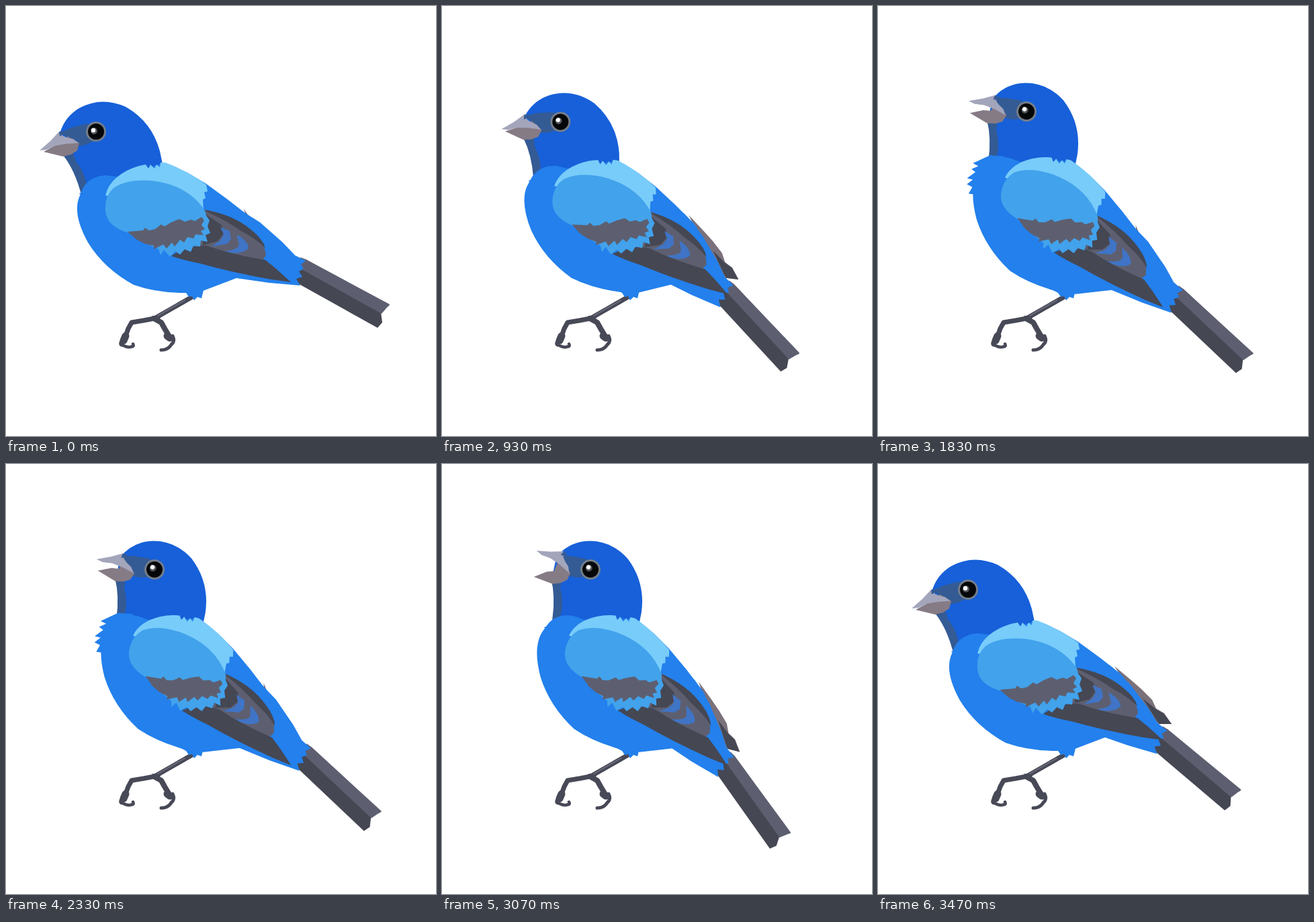
These frames come from a looping animation (640 px wide and 640 px high, 3510 ms). An HTML page:

```html
<!DOCTYPE html>
<html lang="en">
<head>
<meta charset="utf-8">
<title>Blue songbird</title>
<style>
  /* lift: body raised, nod: head nod, drop: tail lowered, gape: beak open, puff: throat feathers */
  @property --lift { syntax: "<number>"; inherits: true; initial-value: 0; }
  @property --nod  { syntax: "<number>"; inherits: true; initial-value: 0; }
  @property --drop { syntax: "<number>"; inherits: true; initial-value: 0; }
  @property --gape { syntax: "<number>"; inherits: true; initial-value: 0; }
  @property --puff { syntax: "<number>"; inherits: true; initial-value: 0; }

  html, body { margin: 0; width: 100%; height: 100%; overflow: hidden; background: #fff; }
  svg {
    display: block; width: 100%; height: 100%;
    animation: 3510ms ease-in-out infinite;
    animation-name: lift, nod, drop, gape, puff;
  }
  @keyframes lift { 0%, 21.9% { --lift: 0; } 31.3%, 91.2% { --lift: 1; } 98.8%, 100% { --lift: 0; } }
  @keyframes nod { 0%, 8% { --nod: 0; } 12.5%, 14.6% { --nod: 1; } 17.7%, 100% { --nod: 0; } }
  @keyframes drop {
    0%, 7.5% { --drop: 0; } 9.5%, 43% { --drop: 1; }
    45%, 70% { --drop: 0; } 72%, 100% { --drop: 1; }
  }
  @keyframes gape {
    0%, 32% { --gape: 0; } 36%, 41% { --gape: .36; } 46.5% { --gape: 1; } 53.1% { --gape: .36; }
    59.8% { --gape: 1; } 65%, 67.5% { --gape: .36; } 73% { --gape: 1; } 79.6% { --gape: .36; }
    85.5%, 89% { --gape: 1; } 93%, 100% { --gape: 0; }
  }
  @keyframes puff {
    0%, 32% { --puff: 0; } 36%, 41% { --puff: 1; } 46.5% { --puff: 0; } 53.1% { --puff: 1; }
    59.8% { --puff: 0; } 65%, 67.5% { --puff: 1; } 73% { --puff: 0; } 79.6% { --puff: 1; }
    85.5%, 100% { --puff: 0; }
  }

  .body { transform-origin: 275px 432px; transform: rotate(calc(var(--lift) * 14.3deg)); }
  .head {
    transform-origin: 134px 187px;
    transform:
      translate(calc(var(--lift) * 87px + var(--nod) * 12px), calc(var(--lift) * -30px + var(--nod) * -6px))
      rotate(calc(var(--lift) * 23.3deg + var(--nod) * 10deg));
  }
  .tail {
    transform-origin: 362px 292px;
    transform:
      translate(calc(var(--drop) * 3px), calc(var(--drop) * 3px))
      rotate(calc(var(--drop) * 11.2deg));
  }
  .far {
    transform-origin: 355px 305px;
    transform: rotate(calc((1 - var(--drop)) * 14deg)) scale(calc(.6 + var(--drop) * .4));
  }
  .upper { transform-origin: 106px 202px; transform: rotate(calc(var(--gape) * 22deg)); }
  .lower { transform-origin: 106px 206px; transform: rotate(calc(var(--gape) * -16deg)); }
  .puff { transform-origin: 128px 290px; transform: scale(calc(.6 + var(--puff) * .4)); }

  .royal { fill: #1760d9; }
  .blue { fill: #2380ec; }
  .sky { fill: #42a2eb; }
  .pale { fill: #78ccfa; }
  .navy { fill: #345b94; }
  .slate { fill: #5d5f70; }
  .dark { fill: #454753; }
  .arc { fill: #3f74c6; }
  .bill { fill: #a3a5bb; }
  .jaw { fill: #857b85; }
  .leg { fill: none; stroke: #484957; stroke-linecap: round; stroke-linejoin: round; }
</style>
</head>
<body>
<svg viewBox="0 0 640 640" role="img" aria-label="A blue songbird">
  <g class="leg">
    <path stroke-width="7" d="M277 433L221 465"/>
    <path stroke-width="7" d="M226 464L205 468L187 471L182 480L177 494"/>
    <path stroke-width="8" d="M220 465L231 471L236 480L242 490"/>
    <path stroke-width="11" d="M178 491L175 498M240 491L244 494"/>
    <path stroke-width="4.5" d="M171 500Q169 505 174 505Q181 509 187 507Q191 507 189 503"/>
    <path stroke-width="5" d="M248 491Q252 499 246 504Q241 512 231 512"/>
    <path stroke="#686a79" stroke-width="2" d="M266 438L226 461"/>
  </g>

  <g class="head">
    <path class="royal" d="M80 190Q87 165 109 152Q142 134 178 150Q217 172 229 216L234 240L225 262L170 288L121 294L112 277L104 240L86 220Z"/>
    <path class="navy" d="M85 222Q102 244 111 277L117 296L124 288L118 257Q112 240 104 231L100 218Z"/>
    <path class="navy" d="M80 189L97 181L120 175L132 178L138 197L120 206L107 209L96 197Z"/>
    <path class="jaw" d="M85 199L92 194L109 204L105 216L92 218L85 210Z"/>
    <path class="jaw lower" d="M56 217L74 207L94 203L109 204L106 215L97 221L85 224Z"/>
    <path class="bill upper" d="M50 215L66 201L79 187L85 187L84 193L91 196L100 198L108 204L90 205L73 208L60 214Z"/>
    <path class="navy upper" d="M79 187L87 186L85 191L80 194Z"/>
    <circle cx="134" cy="187" r="15" fill="#747d8a"/>
    <circle cx="134" cy="187" r="12" fill="#050608"/>
    <circle cx="131" cy="186" r="5" fill="#53575c"/>
    <circle cx="130" cy="185" r="3.2" fill="#fff"/>
  </g>

  <g class="body">
    <g class="far">
      <path fill="#7b717b" d="M352 301L376 321L392 335L408 351L414 364L426 371L437 387L418 387L390 360Z"/>
      <path class="dark" d="M394 349L414 365L425 371L437 387L418 387Z"/>
    </g>
    <g class="tail">
      <path class="dark" d="M438 377L431 411L553 479L560 471L558 456L571 445L446 377Z"/>
      <path class="slate" d="M438 374L446 377L571 444L559 458L440 392Z"/>
      <path class="blue" d="M343 300L378 322L412 352L430 371L446 379L439 385L443 391L436 395L441 403L432 406L438 416L392 412L343 405Z"/>
    </g>
    <path class="blue puff" d="M140 251L118 255L96 273L105 275L96 282L103 285L93 297L102 297L95 306L104 308L101 319L110 318L140 325Z"/>
    <path class="blue" d="M113 274Q122 254 148 252L165 254L235 234L270 248L297 264L330 288L362 313L388 346L400 395L343 405L293 424L266 427Q224 427 190 415Q146 391 122 352Q100 312 108 287Z"/>
    <path class="pale" d="M148 282Q153 259 180 245Q194 238 208 236L212 242L215 236L221 242L224 236L229 240L230 233L237 233Q270 245 298 266L300 276L295 277L297 286L293 288L294 304L250 300Z"/>
    <path class="slate" d="M290 302Q332 309 361 331Q385 350 387 371L382 378L340 380L286 355Z"/>
    <path class="dark" d="M292 303Q337 309 366 334Q382 347 386 360Q370 345 350 335Q328 319 292 303Z"/>
    <path class="dark" d="M295 309L320 325L325 337L315 350L293 356Z"/>
    <path class="arc" d="M319 329L333 335L335 347L329 354L306 358L319 349L324 340Z"/>
    <path class="arc" d="M343 340Q361 350 361 361Q348 372 325 365Q345 363 347 355Z"/>
    <path class="dark" d="M246 372Q272 354 300 357Q336 370 386 378L402 391L424 411L395 407Q338 397 288 383Q263 378 246 372Z"/>
    <path class="sky" d="M148 305Q146 284 160 271Q180 257 217 260Q270 266 296 304L298 312L303 319L300 328L304 338L297 341L300 351L290 349L289 358L279 357L275 366L266 362L259 370L252 365L244 373L235 363L230 371L227 362L205 352L184 338Q150 329 148 305Z"/>
    <path class="slate" d="M181 336L204 334L207 330L213 334L222 332L231 325L236 328L246 322L258 317L266 321L275 318L281 320L291 314L295 319L291 326L296 332L290 335L294 341L282 340L279 346L270 344L265 352L259 348L251 358L247 352L239 361L234 355L220 362L220 357L207 354L195 348Z"/>
  </g>

  <path class="blue" d="M255 420L268 427L272 433L277 432L280 438L285 433L291 435L294 423L306 417L280 410Z"/>
</svg>
</body>
</html>
```
